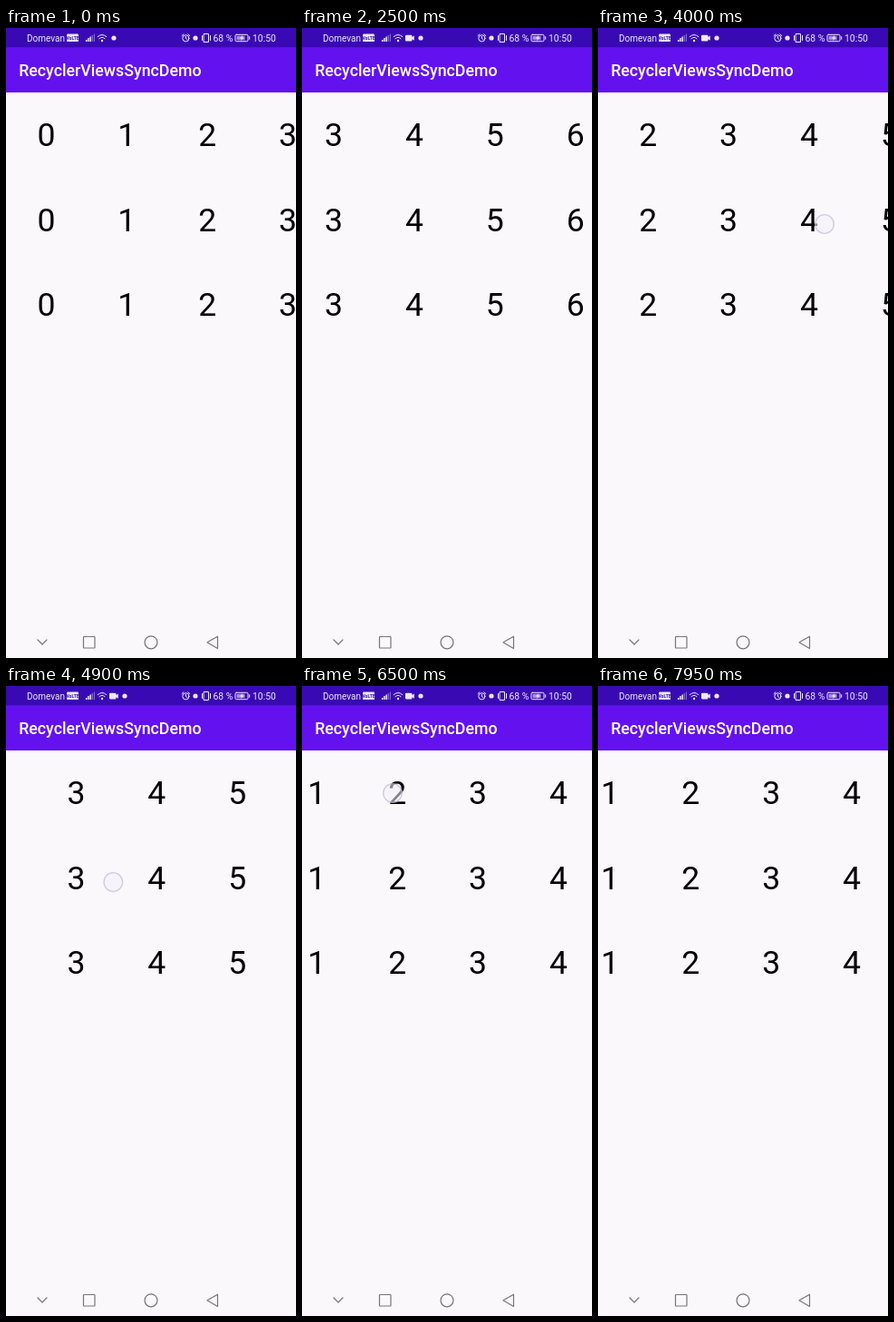
Animation of 320x694 px, one loop 8 s. Source, as an HTML page:

```html
<!DOCTYPE html>
<html lang="en">
<head>
<meta charset="utf-8">
<title>RecyclerViewsSyncDemo</title>
<style>
  html, body { margin: 0; height: 100%; overflow: hidden; background: #fbf8fc; }
  svg { display: block; width: 100vw; height: 100vh; font-family: Roboto, sans-serif; }
  .line { fill: none; stroke-linecap: round; stroke-linejoin: round; }
  .status { fill: #eee8fa; font-size: 10.4px; }
  .status .line { stroke: #eee8fa; }
  .nav { stroke: #77747a; stroke-width: 1.2; }
  .digits { font-size: 35.56px; text-anchor: middle; fill: #000; }
</style>
</head>
<body>
<svg viewBox="0 0 320 694">
  <clipPath id="firstRow"><rect y="71" width="320" height="93"/></clipPath>
  <rect width="320" height="694" fill="#fbf8fc"/>
  <g id="rows" class="digits"></g>
  <ellipse id="glow" cy="115" ry="47" fill="#6200ee" fill-opacity=".09" clip-path="url(#firstRow)"/>
  <circle id="touch" r="10.3" fill="#f4effa" fill-opacity=".55" stroke="#c4bad8" stroke-opacity=".75" stroke-width="1.3"/>

  <rect width="320" height="71" fill="#6411f0"/>
  <rect width="320" height="21.3" fill="#390ab4"/>
  <text x="14.2" y="53" font-size="17.78" font-weight="500" fill="#fff">RecyclerViewsSyncDemo</text>

  <g class="status">
    <text x="23" y="14.8" font-size="10">Domevan</text>
    <rect x="67" y="6.5" width="13" height="8.6" rx="1.2"/>
    <text x="73.5" y="12.8" font-size="5" font-weight="700" text-anchor="middle" fill="#390ab4">VoLTE</text>
    <path d="M88 15v-2h1.5v2zM90.2 15v-4h1.5v4zM92.4 15v-5.5h1.5v5.5z"/>
    <path d="M94.6 15v-7h1.4v7zM96.8 15v-8.5h1.2v8.5z" opacity=".4"/>
    <g class="line">
      <path d="M101.2 9.6q4.8-4.4 9.6 0M102.9 11.7q3.1-2.8 6.2 0"/>
      <circle cx="198.4" cy="11.3" r="3.6"/>
      <path d="M198.4 9.3v2.2l1.5 1M194 8.6l2-1.8M202.8 8.6l-2-1.8"/>
      <path d="M218.5 6.5h5v9h-5zM216.5 8.5v5M225.5 8.5v5"/>
      <rect x="253" y="7.3" width="14" height="7.4" rx="1.3"/>
      <path d="M268.7 9.7v2.6"/>
    </g>
    <circle cx="106" cy="14" r="1.2"/>
    <path id="camera" d="M115 7.8h5.5q1 0 1 1v1.2l2.3-1.6v5.4l-2.3-1.6v1.2q0 1-1 1h-5.500q-1 0-1-1v-4.600q0-1 1-1z"/>
    <circle id="plug" cy="11" r="2.6"/>
    <circle cx="209" cy="11" r="2.6"/>
    <text x="228.500" y="14.800">68 %</text>
    <rect x="254.500" y="8.800" width="9" height="4.400" opacity=".6"/>
    <path d="M261 8l-3 3.400h2l-1 2.700 3.500-3.700h-2z"/>
    <text x="272" y="14.800">10:50</text>
  </g>

  <g class="line nav">
    <path d="M35 674l5 5 5-5"/>
    <rect x="85.500" y="670.500" width="12.500" height="12.500" rx=".5"/>
    <circle cx="160" cy="676.800" r="7"/>
    <path d="M222 676.800l11.500-6.600v13.200z"/>
  </g>
</svg>
<script>
const LOOP = 8000, STEP = 50, ITEM = 88.89, ROW = 93.33;
const $ = id => document.getElementById(id);
const clamp = v => Math.min(1, Math.max(0, v));

// Each swipe drags from one offset to another, then flings to rest.
const swipes = [
  { start: 1450, release: 1680, end: 2650, from: 0, drag: 110, rest: 278, x: 315, y: 306 },
  { start: 2650, release: 2900, end: 3980, from: 278, drag: 225, rest: 167, x: 110, y: 306 },
  { start: 4000, release: 4250, end: 4800, from: 167, drag: 225, rest: 262, x: 250, y: 216 },
  { start: 4800, release: 5050, end: 5650, from: 262, drag: 150, rest: 57, x: 90, y: 216 },
  { start: 5650, release: 5850, end: 6480, from: 57, drag: 78.5, rest: 117, x: 263, y: 218 },
  { start: 6500, release: 6680, end: 7040, from: 117, drag: 45, rest: -50, x: 100, y: 118 },
  { start: 7050, release: 7270, end: 7990, from: 0, drag: 90, rest: 120, x: 238, y: 215 }
];

function dragOffset(s, t) {
  return s.from + (s.drag - s.from) * clamp((t - s.start) / (s.release - s.start)) ** 1.5;
}

function scrollOffset(s, t) {
  if (t < s.release) return dragOffset(s, t);
  const left = 1 - clamp((t - s.release) / (s.end - s.release));
  return Math.max(0, s.rest + (s.drag - s.rest) * left ** 2.4);
}

for (let row = 0; row < 3; row++)
  for (let n = 0; n < 10; n++) {
    const text = document.createElementNS("http://www.w3.org/2000/svg", "text");
    text.setAttribute("x", ITEM * (n + 0.5));
    text.setAttribute("y", 130.3 + ROW * row);
    text.textContent = n;
    $("rows").append(text);
  }

function draw(t) {
  const swipe = swipes.findLast(s => t >= s.start);
  const offset = swipe ? scrollOffset(swipe, t) : 0;
  $("rows").setAttribute("transform", `translate(${-offset})`);

  const touch = $("touch");
  touch.setAttribute("opacity", swipe ? clamp(1 - (t - swipe.release) / 30) : 0);
  if (swipe) {
    touch.setAttribute("cx", swipe.x - dragOffset(swipe, t) + swipe.from);
    touch.setAttribute("cy", swipe.y);
  }

  // The edge glow swells when the list hits its start, then recedes.
  const grow = clamp((t - 6740) / 120), fade = clamp((7370 - t) / 400);
  $("glow").setAttribute("rx", 27 * grow * fade);

  const recording = t >= 50;
  $("camera").setAttribute("opacity", recording ? 1 : 0);
  $("plug").setAttribute("cx", recording ? 131 : 119);
}

const began = performance.now();
function tick() {
  const t = (performance.now() - began) % LOOP;
  draw(Math.floor(t / STEP) * STEP);
  requestAnimationFrame(tick);
}
tick();
</script>
</body>
</html>
```
